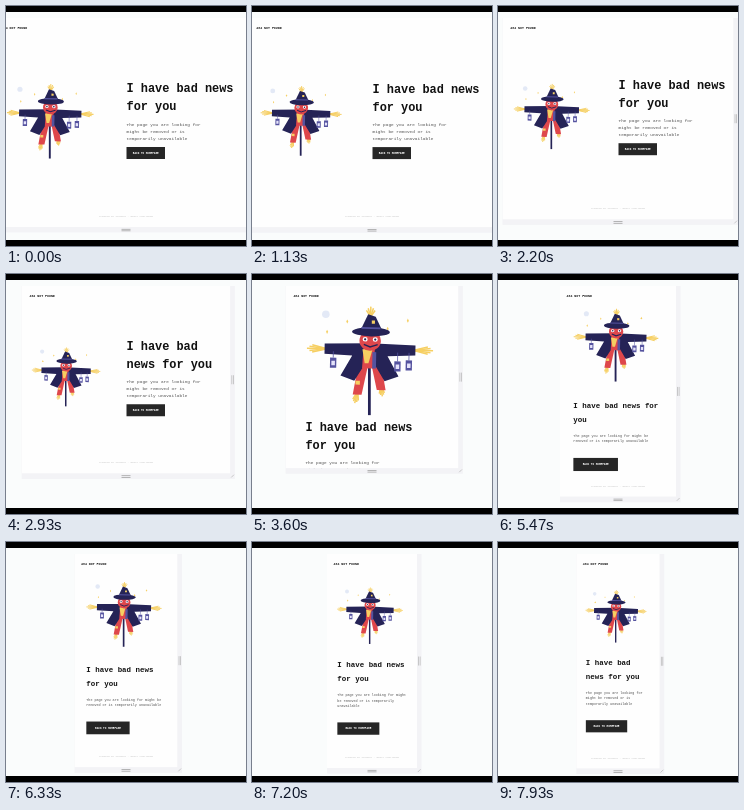
Recreate the animation shown at these times as an HTML page with a canvas. Size 240 by 240 pixels, loop 8000 ms.

```html
<!DOCTYPE html>
<html lang="en">
<head>
<meta charset="utf-8">
<title>404 Not Found</title>
<style>
  html, body { margin: 0; height: 100%; overflow: hidden; background: #000; }
  canvas { display: block; width: 100vw; height: 100vh; }
</style>
</head>
<body>
<canvas id="stage"></canvas>
<script>
const LOOP = 8000, SIZE = 240, MID = 120, TOP = 12;
const NAVY = '#252356', VIOLET = '#55539f', RED = '#de474b', STRAW = '#f6cf62', INK = '#111';
const ADVANCE = 0.6;   // character width of the monospaced face, in em

const canvas = document.getElementById('stage');
const ctx = canvas.getContext('2d');

function smoothstep(k) {
  k = Math.min(1, Math.max(0, k));
  return k * k * (3 - 2 * k);
}

// A slow steady drag with one quick pull; the lower edge dips during the pull.
function viewportAt(seconds) {
  const pull = smoothstep((seconds - 2.3) / 2.4);
  const dip = Math.exp(-(((seconds - 3.5) / 1.2) ** 2));
  return {
    width: Math.max(83.5, 264 - 15 * seconds - 66 * pull),
    bottom: 221 + 0.7 * seconds - 29.5 * dip
  };
}

function rect(x, y, w, h, color) {
  ctx.fillStyle = color;
  ctx.fillRect(x, y, w, h);
}

function poly(color, ...points) {
  ctx.fillStyle = color;
  ctx.beginPath();
  points.forEach(([x, y]) => ctx.lineTo(x, y));
  ctx.fill();
}

function oval(x, y, rx, ry, color) {
  ctx.fillStyle = color;
  ctx.beginPath();
  ctx.ellipse(x, y, rx, ry, 0, 0, Math.PI * 2);
  ctx.fill();
}

function line(color, width, ...points) {
  ctx.strokeStyle = color;
  ctx.lineWidth = width;
  ctx.beginPath();
  points.forEach(([x, y]) => ctx.lineTo(x, y));
  ctx.stroke();
}

// Set large and scaled down, so that tiny sizes keep exact widths.
function text(str, x, y, size, color = INK, weight = 400, align = 'left') {
  ctx.save();
  ctx.translate(x, y);
  ctx.scale(size / 100, size / 100);
  ctx.font = `${weight} 100px "Liberation Mono", monospace`;
  ctx.textAlign = align;
  ctx.fillStyle = color;
  ctx.fillText(str, 0, 0);
  ctx.restore();
}

function wrap(str, width, size) {
  const limit = Math.floor(width / (size * ADVANCE));
  const lines = [''];
  for (const word of str.split(' ')) {
    const last = lines[lines.length - 1];
    const joined = last ? last + ' ' + word : word;
    if (joined.length <= limit || !last) lines[lines.length - 1] = joined;
    else lines.push(word);
  }
  return lines;
}

function lantern(x, y) {
  line(VIOLET, 0.6, [x, 2], [x, y - 4]);
  rect(x - 2.5, y - 4, 5, 8, VIOLET);
  rect(x - 1.4, y - 1.5, 2.8, 3.5, '#e4e2fa');
}

// A fan of stalks from one point.
function straw(x, y, angle, length, spread) {
  for (let i = -2; i <= 2; i++) {
    const a = angle + i * spread, reach = length * (1 - Math.abs(i) * 0.12);
    line(STRAW, 1.2, [x, y], [x + Math.cos(a) * reach, y + Math.sin(a) * reach]);
  }
}

function star(x, y, r) {
  poly(STRAW, [x, y - r], [x + r / 2, y], [x, y + r], [x - r / 2, y]);
}

function face() {
  oval(0, -7, 8.5, 8, RED);
  for (const side of [-1, 1]) {
    oval(side * 4, -8, 2, 1.8, '#fff');
    oval(side * 4, -8, 0.9, 0.9, NAVY);
  }
  line(NAVY, 1.2, [-5, -4], [0, -2], [6, -4]);
}

function hat() {
  straw(0, -26, -Math.PI / 2, 8, 0.3);
  poly(NAVY, [-7, -17], [-2, -28], [4, -26], [9, -16]);
  oval(0.5, -14, 15, 3.6, NAVY);
  line(VIOLET, 1.4, [-7, -17], [8, -17]);
  rect(1, -23, 2.5, 2.5, STRAW);
}

// Arm span is 100 units, the origin lies between the hands.
function scarecrow(cx, cy, span) {
  ctx.save();
  ctx.translate(cx, cy);
  ctx.scale(span / 100, span / 100);
  oval(-35, -28, 3, 3, '#e3e9f6');
  for (let i = 0; i < 5; i++) star(-34 + i * 16, -14 - 9 * Math.abs(Math.sin(i * 2)), 1.6);
  rect(-1.6, 8, 2.2, 44, NAVY);
  ctx.rotate(0.02);

  straw(-9, 33, 1.8, 10, 0.15);
  straw(9, 28, 1.4, 9, 0.15);
  for (const side of [-1, 1]) {
    const hem = side < 0 ? 36 : 32;
    straw(side * 34, 0, side < 0 ? Math.PI : 0, 16, 0.12);
    poly(RED, [0, 6], [side * 8, 6], [side * 13, hem], [side * 6, hem]);
    poly(NAVY, [0, -5], [side * 36, -4], [side * 36, 4], [side * 14, 5],
      [side * 23, 21], [side * 12, 25], [side * 4, 12]);
  }
  poly(RED, [-5, -4], [4, -4], [3, 15], [-6, 15]);
  poly(STRAW, [-6, 0], [2, 0], [-1, 11], [-4, 11]);
  rect(2, 2, 3, 13, VIOLET);
  rect(-11, 25, 3.5, 3, STRAW);
  face();
  hat();

  lantern(-29, 11);
  lantern(22, 13);
  lantern(31, 12);
  ctx.restore();
}

function button(x, y, w, h) {
  rect(x, y, w, h, '#262626');
  text('BACK TO HOMEPAGE', x + w / 2, y + h / 2 + 0.9, 2.7, '#fff', 700, 'center');
}

function page(width, bottom) {
  const left = MID - width / 2;
  const wide = width > 205, small = width < 122;
  const pad = width * 0.115;
  const headSize = small ? 7.45 : 11.88;
  const bodySize = small ? 3.37 : 4.41;

  let x, y;
  if (wide) {
    const handY = bottom / 2 - 3;
    x = MID + 0.5;
    y = handY - 21;
    scarecrow(left + width * 0.213, handY, width * 0.328);
  } else {
    const hatTop = small ? 38 + (116 - width) * 0.385 : 37.5;
    x = left + pad;
    y = small ? 94.5 + width * 0.34 : 51.5 + width * 0.61;
    scarecrow(MID - 2, hatTop + width * 0.22, width * 0.73);
  }

  text('404 NOT FOUND', left + (small ? 6.5 : 7.8), 23, 3.25, INK, 700);

  const room = wide ? Math.min(115, width / 2 - 3) : width - 2 * pad;
  const headGap = small ? 14.2 : 18;
  const heading = wrap('I have bad news for you', room, headSize);
  heading.forEach((str, i) => text(str, x, y + i * headGap, headSize, INK, 700));
  y += (heading.length - 1) * headGap + 14;

  const bodyGap = small ? 5.3 : 7;
  const body = wrap('The page you are looking for might be removed or is temporarily unavailable',
    small ? room : Math.min(room, 85), bodySize);
  body.forEach((str, i) => text(str, x, y + i * bodyGap + bodySize * 0.27, bodySize, '#4f4f4f'));
  y += (body.length - 1) * bodyGap;

  if (small) {
    const w = 33 + width * 0.1;
    button(x, y + 16.5, w, w / 3.4);
  } else {
    button(x, y + 8.5, 38.5, 12);
  }

  if (wide || small) {
    text('created by student - daily challenge', MID, bottom - 10, 2.5, '#bdbdbd', 400, 'center');
  }
}

function draw(seconds) {
  const { width, bottom } = viewportAt(seconds);
  const left = MID - width / 2, right = MID + width / 2;

  rect(0, 0, SIZE, SIZE, '#fafcfc');
  rect(left, TOP, width + 4.5, bottom - TOP + 5.5, '#f3f3f6');

  ctx.save();
  ctx.beginPath();
  ctx.rect(left, TOP, width, bottom - TOP);
  ctx.clip();
  rect(left, TOP, width, bottom - TOP, '#fefefe');
  page(width, bottom);
  ctx.restore();

  // drag handles
  const midY = (TOP + bottom) / 2;
  for (const d of [2.2, 3.8]) {
    rect(MID - 4.5, bottom + d - 0.3, 9, 0.7, '#999');
    rect(right + d - 1, midY - 4.5, 0.6, 9, '#aaa');
  }
  line('#aaa', 0.6, [right + 0.8, bottom + 4], [right + 3.6, bottom + 1.2]);

  rect(0, 0, SIZE, 6, '#000');
  rect(0, 234, SIZE, 6, '#000');
}

function frame(now) {
  const w = Math.round(innerWidth * devicePixelRatio);
  const h = Math.round(innerHeight * devicePixelRatio);
  if (canvas.width !== w || canvas.height !== h) {
    canvas.width = w;
    canvas.height = h;
  }
  ctx.setTransform(w / SIZE, 0, 0, h / SIZE, 0, 0);
  draw((now % LOOP) / 1000);
  requestAnimationFrame(frame);
}
requestAnimationFrame(frame);
</script>
</body>
</html>
```
